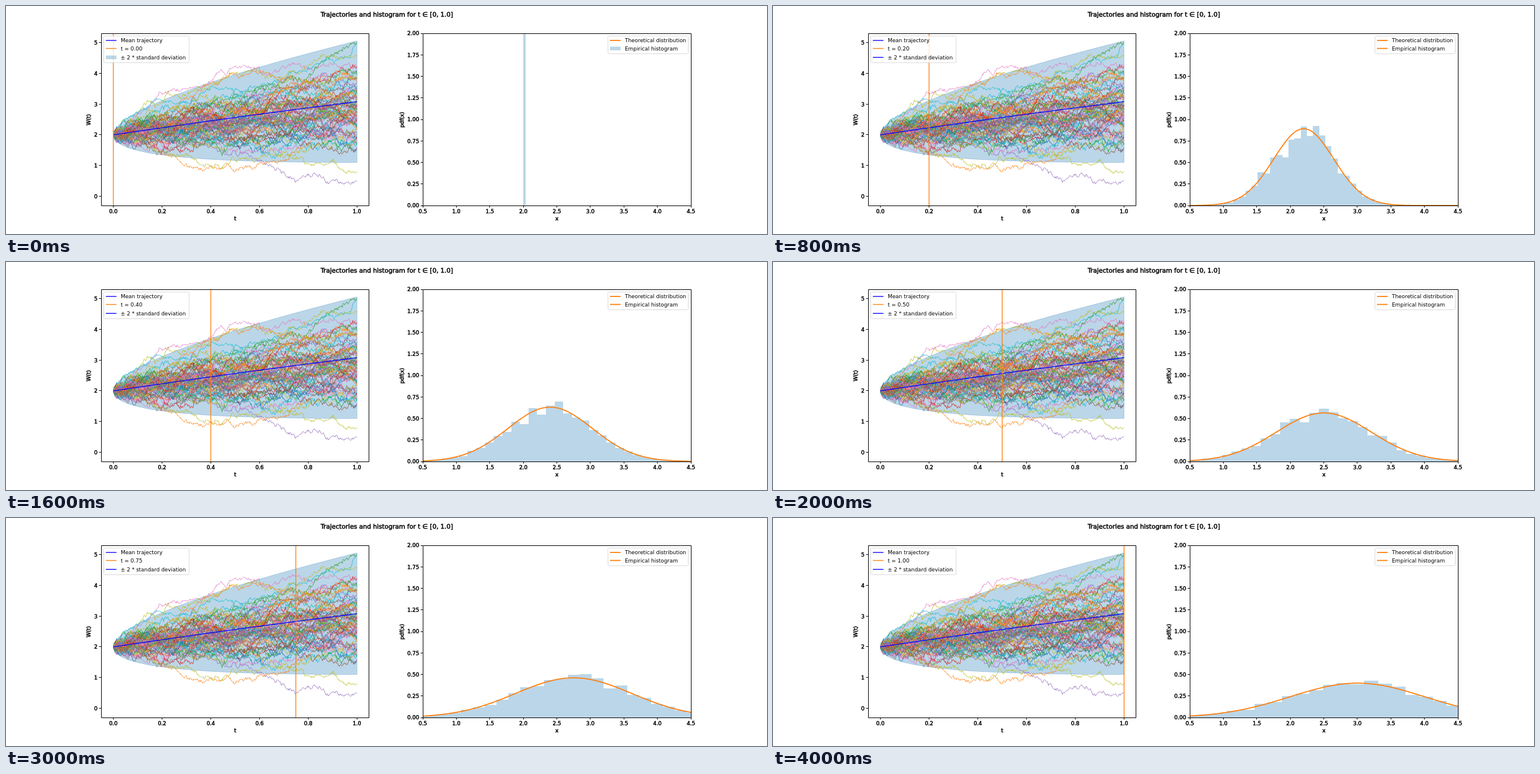
These frames come from a looping animation (1280x384 px, 4.2 s). An HTML page:

```html
<!DOCTYPE html>
<html lang="en">
<head>
<meta charset="utf-8">
<title>Trajectories and histogram</title>
<style>
  html, body { margin: 0; width: 100%; height: 100%; overflow: hidden; background: #fff; }
  svg { display: block; width: 1280px; height: 384px; }
  text { font: 8.89px "DejaVu Sans", sans-serif; fill: #000; white-space: pre; }
  .heavy { stroke: #000; stroke-width: .5px; }
  .title { font-size: 10.67px; }
  .walk { fill: none; stroke-width: .8; stroke-linejoin: round; }
  .line { fill: none; stroke-width: 1.33; }
  .thick { fill: none; stroke-width: 1.78; }
  .axis { fill: none; stroke: #000; stroke-width: 1; }
  .tint { fill: #1f77b4; fill-opacity: .3; }
  .box { fill: #fff; fill-opacity: .8; stroke: #ccc; stroke-opacity: .8; stroke-width: .9; }
</style>
</head>
<body>
<svg id="stage" viewBox="0 0 1280 384">
  <defs>
    <clipPath id="leftClip"><rect x="160" y="46" width="451" height="290"/></clipPath>
    <clipPath id="rightClip"><rect x="701" y="46" width="451" height="290"/></clipPath>
  </defs>
</svg>
<script>
const stage = document.getElementById("stage");
const COLORS = ["#1f77b4", "#ff7f0e", "#2ca02c", "#d62728", "#9467bd",
                "#8c564b", "#e377c2", "#7f7f7f", "#bcbd22", "#17becf"];
const ORANGE = COLORS[1], BLUE = "#00f";
const STEP_MS = 200, STEPS = 21;
const TOP = 46, BASE = 336;

function add(parent, tag, attrs, text) {
  const el = document.createElementNS("http://www.w3.org/2000/svg", tag);
  for (const k in attrs) el.setAttribute(k, attrs[k]);
  if (text !== undefined) el.textContent = text;
  parent.append(el);
  return el;
}
const polyline = pts => "M" + pts.map(p => p[0].toFixed(2) + " " + p[1].toFixed(2)).join("L");
const lerp = (a, b, u) => a + (b - a) * u;
const snap = v => Math.floor(v) + 0.5;

function generator(seed) {
  return () => {
    seed = (seed + 0x6D2B79F5) | 0;
    let n = Math.imul(seed ^ (seed >>> 15), 1 | seed);
    n = (n + Math.imul(n ^ (n >>> 7), 61 | n)) ^ n;
    return ((n ^ (n >>> 14)) >>> 0) / 4294967296;
  };
}
const gauss = rng => Math.sqrt(-2 * Math.log(1 - rng())) * Math.cos(2 * Math.PI * rng());
const normal = z => Math.exp(-z * z / 2) / Math.sqrt(2 * Math.PI);

// Data to pixels
const timeX = t => 180.5 + 409.9 * t;
const valueY = v => 320.4 - 51.7 * v;
const histX = x => 701.1 + 112.73 * (x - 0.5);
const histY = d => BASE - 145 * d;

// ---- Left plot ----
const left = add(stage, "g", { "clip-path": "url(#leftClip)" });
const grid = Array.from({ length: 101 }, (_, i) => i / 100);
const mean = t => 2 + 1.08 * t + 0.025 * Math.sin(Math.PI * t);
const edge = side => grid.map(t => [timeX(t), valueY(mean(t) + side * 1.98 * Math.sqrt(t))]);
add(left, "path", { class: "tint", stroke: "#1f77b4", "stroke-opacity": .3, "stroke-width": .9,
  d: polyline([...edge(1), ...edge(-1).reverse()]) + "Z" });

const N = 500;
const random = generator(2024);
// Brownian bridge over n steps
function bridge(n) {
  const w = [0];
  for (let i = 0; i < n; i++) w.push(w[i] + gauss(random) / Math.sqrt(N));
  return w.map((v, i) => v - w[n] * i / n);
}
function drawWalk(values, color) {
  add(left, "path", { class: "walk", stroke: COLORS[color],
    d: polyline(values.map((v, i) => [timeX(i / N), valueY(v)])) });
}

// Outer paths: colour, then values at each quarter of the time
const outer = [
  [6, 3.5, 4.25, 4.3, 4.2],
  [9, 3, 3.5, 4, 5],
  [8, 3.3, 4, 4, 4.6],
  [1, 2.9, 4, 3.8, 3.9],
  [2, 2.6, 3.3, 3.5, 5],
  [4, 1.75, 1.45, 0.5, 0.5],
  [1, 1.3, 0.8, 1.5, 1.9],
  [8, 1.35, 1.15, 1.2, 0.8]
];
for (const [color, ...ends] of outer) {
  const n = N / ends.length, values = [2];
  for (const end of ends) {
    const from = values[values.length - 1];
    bridge(n).slice(1).forEach((b, i) => values.push(lerp(from, end, (i + 1) / n) + 0.65 * b));
  }
  drawWalk(values, color);
}

// Inner paths: random, kept within the cloud
const INNER = 58;
const inCloud = (v, i) => Math.abs(v - 2 - 0.8 * i / N) < 1.45 * Math.sqrt(i / N) + 0.2;
for (let k = 0; k < INNER; k++) {
  const s = 2 * (((k * 19) % INNER) + 0.5) / INNER - 1;
  const end = 2.85 + 0.7 * (s + s ** 3);
  let values, tries = 0;
  do values = bridge(N).map((b, i) => lerp(2, end, i / N) + 0.9 * b);
  while (!values.every(inCloud) && ++tries < 200);
  drawWalk(values, k % 10);
}
add(left, "path", { class: "line", stroke: BLUE, d: polyline(grid.map(t => [timeX(t), valueY(mean(t))])) });
const cursor = add(left, "line", { class: "line", stroke: ORANGE, y1: TOP, y2: BASE });

// ---- Right plot ----
const right = add(stage, "g", { "clip-path": "url(#rightClip)" });
const bars = add(right, "path", { class: "tint", "shape-rendering": "crispEdges" });
const curve = add(right, "path", { class: "thick", stroke: ORANGE });

// Normal density in 29 bins with sampling noise
function barsPath(t) {
  if (t === 0) return `M870.1 ${BASE}V${TOP}H873.9V${BASE}Z`;
  const sd = Math.sqrt(t), width = 0.205, rng = generator(Math.round(t * 1000));
  const x = z => histX(2 + t + z * sd).toFixed(2);
  let d = `M${x(-14.5 * width)} ${BASE}`;
  for (let i = -14; i <= 14; i++) {
    const density = normal(i * width) / sd * (1 + 0.08 * gauss(rng));
    d += `V${histY(density).toFixed(2)}H${x((i + 0.5) * width)}`;
  }
  return d + `V${BASE}Z`;
}
function curvePath(t) {
  if (t === 0) return "";
  const sd = Math.sqrt(t), pts = [];
  for (let x = 0.5; x <= 4.501; x += 0.02) pts.push([histX(x), histY(normal((x - 2 - t) / sd) / sd)]);
  return polyline(pts);
}

// ---- Axes and labels ----
const label = (x, y, text, anchor = "middle", extra = {}) =>
  add(stage, "text", { class: "heavy", x, y, "text-anchor": anchor, ...extra }, text);

function frame(x0, x1) {
  add(stage, "path", { class: "axis", d: `M${x0} 46.5H${x1}V336.5H${x0}Z` });
}
function tickX(x, text) {
  add(stage, "path", { class: "axis", d: `M${snap(x)} 336v3.5` });
  label(x, 349, text);
}
function tickY(x, y, text) {
  add(stage, "path", { class: "axis", d: `M${x} ${snap(y)}h-3.5` });
  label(x - 6.2, y + 3.3, text, "end");
}
frame(160.5, 610.5);
frame(701.5, 1152.5);
for (let i = 0; i <= 5; i++) {
  tickX(timeX(i / 5), (i / 5).toFixed(1));
  tickY(160, valueY(i), i);
}
for (let i = 0; i <= 8; i++) {
  tickX(histX(0.5 + i / 2), (0.5 + i / 2).toFixed(1));
  tickY(701, histY(i / 4), (i / 4).toFixed(2));
}
label(385.5, 361, "t");
label(926.7, 361, "x");
label(0, 0, "W(t)", "middle", { transform: "translate(142 191.5) rotate(-90)" });
label(0, 0, "pdf(x)", "middle", { transform: "translate(669 191.5) rotate(-90)" });
label(640.5, 18, "Trajectories and histogram for t \u2208 [0, 1.0]", "middle", { class: "heavy title" });

// ---- Legends ----
function legendBox(x, width, height) {
  add(stage, "rect", { class: "box", x, y: 50.5, width, height, rx: 2 });
}
function legendRow(x, y, text, color, style = "line") {
  const line = add(stage, "path", { class: style, stroke: color, d: `M${x} ${y}h17.8` });
  const patch = add(stage, "rect", { class: "tint", x, y: y - 3.1, width: 17.8, height: 6.2, visibility: "hidden" });
  const words = add(stage, "text", { x: x + 25, y: y + 3.2 }, text);
  return { line, patch, words };
}
legendBox(164.5, 143.5, 45);
legendRow(168, 58, "Mean trajectory", BLUE);
const timeRow = legendRow(168, 71.5, "", ORANGE);
const bandRow = legendRow(168, 86.5, "\u00b1 2 * standard deviation", BLUE);
legendBox(1012.5, 135, 30);
legendRow(1016, 58, "Theoretical distribution", ORANGE, "thick");
const histRow = legendRow(1016, 71.5, "Empirical histogram", ORANGE, "thick");

function show(step) {
  const t = step / (STEPS - 1);
  cursor.setAttribute("x1", snap(timeX(t)));
  cursor.setAttribute("x2", snap(timeX(t)));
  timeRow.words.textContent = "t = " + t.toFixed(2);
  bars.setAttribute("d", barsPath(t));
  curve.setAttribute("d", curvePath(t));
  for (const row of [bandRow, histRow]) {
    row.line.setAttribute("visibility", step ? "visible" : "hidden");
    row.patch.setAttribute("visibility", step ? "hidden" : "visible");
  }
}

let shown = 0;
show(0);
const start = performance.now();
function tick() {
  const step = Math.floor(Math.max(performance.now() - start, 0) / STEP_MS) % STEPS;
  if (step !== shown) show(shown = step);
  requestAnimationFrame(tick);
}
requestAnimationFrame(tick);
</script>
</body>
</html>
```
